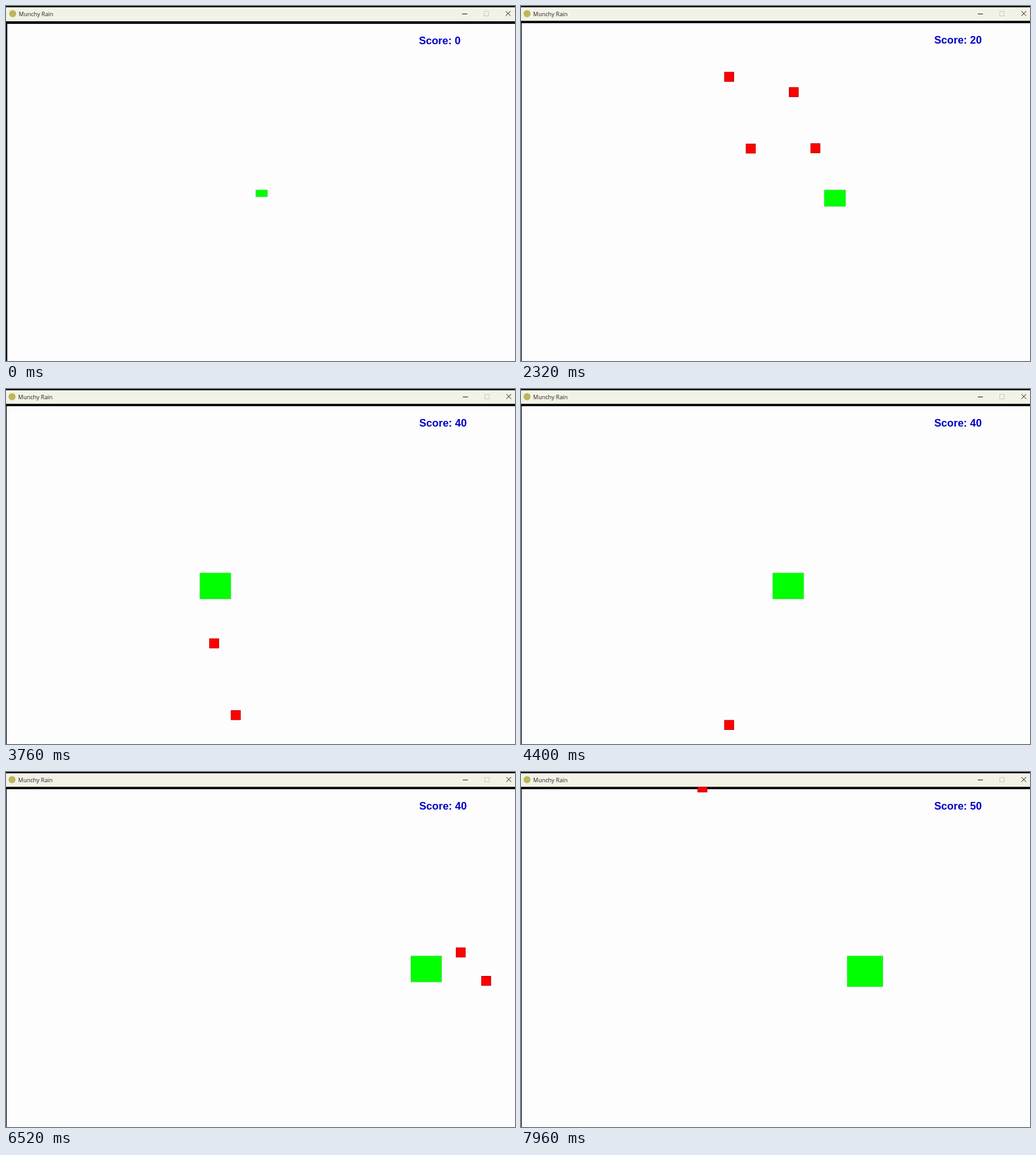
These frames come from a looping animation (800x557 px, 8000 ms). An HTML page with a canvas:

```html
<!DOCTYPE html>
<html lang="en">
<head>
<meta charset="utf-8">
<title>Munchy Rain</title>
<style>
  html, body { margin: 0; width: 100%; height: 100%; overflow: hidden; background: #fefdfe; }
  canvas { display: block; width: 100%; height: 100%; }
</style>
</head>
<body>
<canvas id="stage" width="800" height="557"></canvas>
<script>
const ctx = document.getElementById('stage').getContext('2d');
const LOOP = 8000, STEP = 40;
const FALL = 0.2; // px per ms
const FLOOR_TOP = 288.5;

// x, y at time t; caught when eaten by the player
const drops = [
  { x: 387, y: 191, t: 1280, caught: 1700 },
  { x: 488.5, y: 72.5, t: 1280, caught: 2290 },
  { x: 455, y: 215.5, t: 2320, caught: 2610 },
  { x: 421, y: 127.5, t: 2320, caught: 3050 },
  { x: 353.5, y: 216, t: 2320 },
  { x: 319.5, y: 103.5, t: 2320 },
  { x: 747, y: 320, t: 6520 },
  { x: 707, y: 275.5, t: 6520, caught: 6630 },
  { x: 277.5, y: 16.5, t: 7960 }
];

// [time, left edge of the player]
const path = [
  [0, 392.5], [700, 392.5], [775, 377.5], [1825, 377.5], [2320, 476.5],
  [2450, 476.5], [2890, 388.5], [3340, 388.5], [3853, 286], [4420, 399.5],
  [5360, 399.5], [6520, 636], [6760, 685], [7112, 685], [7960, 512.5], [8000, 504.5]
];

function along(points, t) {
  let i = 1;
  while (i < points.length - 1 && t > points[i][0]) i++;
  const [t0, a] = points[i - 1], [t1, b] = points[i];
  return a + (b - a) * (t - t0) / (t1 - t0);
}

function box(x, y, w, h, fill, edge) {
  ctx.fillStyle = fill;
  ctx.fillRect(x, y, w, h);
  ctx.strokeStyle = edge;
  ctx.lineWidth = 0.8;
  ctx.strokeRect(x + 0.4, y + 0.4, w - 0.8, h - 0.8);
}

function line(x0, y0, x1, y1) {
  ctx.beginPath();
  ctx.moveTo(x0, y0);
  ctx.lineTo(x1, y1);
  ctx.stroke();
}

function label(text, x, y, font, color) {
  ctx.font = font;
  ctx.fillStyle = color;
  ctx.fillText(text, x, y);
}

// s: small settling offset of the window, 1 to 0
function drawWindow(s) {
  ctx.fillStyle = '#000';
  ctx.fillRect(0, 0, 800, 557);
  ctx.fillStyle = '#f3f2e7';
  ctx.fillRect(0, 2, 800, 21.3 + s * 0.7);
  ctx.fillStyle = '#fefdfe';
  ctx.fillRect(1 + s, 27 + s, 800, 557);

  ctx.fillStyle = '#bdb65a';
  ctx.beginPath();
  ctx.arc(9.5 + s, 12, 5.5, 0, Math.PI * 2);
  ctx.fill();
  label('Munchy Rain', 19 + s, 15.5 + s * 0.5, '9px "Open Sans", "Noto Sans", sans-serif', '#222');

  ctx.lineWidth = 1;
  ctx.strokeStyle = '#222';
  line(718 - s, 12.5, 726 - s, 12.5);
  line(786.5 - s, 8, 794 - s, 15.5);
  line(794 - s, 8, 786.5 - s, 15.5);
  ctx.strokeStyle = '#cfcec5';
  ctx.strokeRect(752.5 - s, 8.5, 7, 7);
}

function draw(t) {
  const score = 10 * drops.filter(d => t >= d.caught).length;
  const settle = Math.max(0, 1 - t / 400);
  drawWindow(settle);

  ctx.save();
  ctx.beginPath();
  ctx.rect(0, 23.5, 800, 534);
  ctx.clip();
  for (const d of drops) {
    if (t >= d.caught) continue;
    const y = d.y + (t - d.t) * FALL;
    if (y > 8 && y < 557) box(d.x, y, 15.3, 15.3, '#f00', 'rgba(110,0,0,.55)');
  }
  ctx.restore();

  box(along(path, t), FLOOR_TOP, 18.7 + score * 0.757, 11 + score * 0.752,
    '#0f0', 'rgba(110,200,110,.75)');
  label('Score: ' + score, 649.5 - settle * 0.6, 59.3 + settle * 0.7,
    'bold 16.6px "Liberation Sans", Arial, sans-serif', '#0000c4');
}

const start = performance.now();
function tick() {
  const t = Math.max(0, performance.now() - start) % LOOP;
  draw(Math.floor(t / STEP) * STEP);
  requestAnimationFrame(tick);
}
tick();
</script>
</body>
</html>
```
